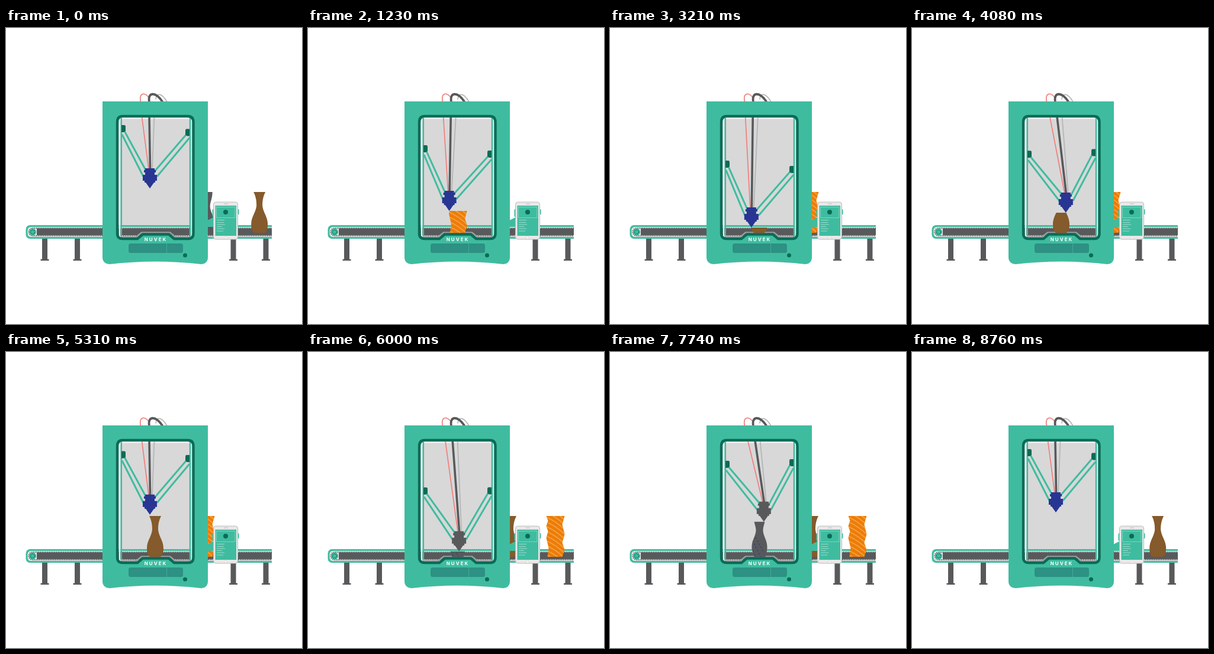
Recreate the animation shown at these times as an HTML page. Size 500x500 px, loop 8790 ms.

```html
<!DOCTYPE html>
<html lang="en">
<head>
<meta charset="utf-8">
<title>Printing line</title>
<style>
  html, body { margin: 0; width: 100%; height: 100%; overflow: hidden; background: #fff; }
  svg { display: block; width: 100vw; height: 100vh; }
  .green { fill: #3fbc9f; }
  .deep { fill: #0b6b57; }
  .dark { fill: #58595b; }
  .line { fill: none; }
  .name { font: 700 8px Inter, "Liberation Sans", sans-serif; letter-spacing: 2px; fill: #fff; }
</style>
</head>
<body>
<svg viewBox="0 0 500 500">
  <defs>
    <clipPath id="stage"><rect width="449" height="500"/></clipPath>
    <clipPath id="glass"><rect x="190" y="151" width="125" height="204"/></clipPath>
    <path id="pane" d="M197 149H307Q316.500 149 316.500 159V347Q316.500 356 308 356H284L275 348.500H231L222 356H197Q188 356 188 347V159Q188 149 197 149Z"/>
    <path id="twist" d="M-15 277H16L12 291L16 308L12 322L16 334L12 346H-13L-11 331L-15 314L-12 303L-15 294L-12 285Z"/>
    <path id="vase" d="M-10 277H10C6 285 5 292 5 300C6 312 14 318 14 332C14 340 11 346 8 346H-8C-11 346 -14 340 -14 332C-14 318 -6 312 -5 300C-5 292 -6 285 -10 277Z"/>
    <path id="urn" d="M-10 277H10C10 288 6 294 6 301C6 310 13 318 13 329C13 337 11 342 10 346H-9C-10 342 -13 337 -13 329C-13 318 -6 310 -6 301C-6 294 -10 288 -10 277Z"/>
    <clipPath id="twistEdge"><use href="#twist"/></clipPath>
    <clipPath id="urnEdge"><use href="#urn"/></clipPath>
    <clipPath id="grow0"><rect x="-30" y="270" width="60" height="80"/></clipPath>
    <clipPath id="grow1"><rect x="-30" y="270" width="60" height="80"/></clipPath>
    <clipPath id="grow2"><rect x="-30" y="270" width="60" height="80"/></clipPath>
    <path id="leg" class="dark" d="M-4.500 355H4.500V390.500H7V393H-7V390.500H-4.500Z"/>
  </defs>

  <rect x="188" y="149" width="128" height="207" fill="#d8d8d8"/>

  <g clip-path="url(#stage)">
    <use href="#leg" x="65.500"/><use href="#leg" x="120.500"/>
    <use href="#leg" x="384"/><use href="#leg" x="439"/>
    <rect class="green" x="33.500" y="333" width="440" height="23" rx="7"/>
    <rect x="36.500" y="336" width="440" height="17" rx="5.500" fill="#e8e8e8"/>
    <rect class="dark" x="52" y="338.500" width="420" height="11.500"/>
    <path class="line teeth" d="M470 338H45A6.500 6.500 0 0 0 45 351H470" stroke="#58595b" stroke-width="1.800" stroke-dasharray="1.500 1.500"/>
    <circle class="green" cx="45" cy="344.500" r="6"/>
    <circle class="line teeth" cx="45" cy="344.500" r="3.600" stroke="#0b6b57" stroke-width="1.500" stroke-dasharray="1.500 1.500"/>
    <path class="line" d="M194 353.500H219L229 345.500H277L287 353.500H312" stroke="#9b9d9e" stroke-width="2.500"/>

    <g class="item"><g clip-path="url(#grow0)">
      <use href="#twist" fill="#ec7d08"/>
      <path id="orangeLines" class="line" clip-path="url(#twistEdge)" stroke="#f7a345" stroke-width="1.700"/>
    </g></g>
    <g class="item"><g clip-path="url(#grow1)"><use href="#vase" fill="#855a2c"/></g></g>
    <g class="item"><g clip-path="url(#grow2)">
      <use href="#urn" class="dark"/>
      <path class="line" clip-path="url(#urnEdge)" d="M-12 318L2 346M-7 313L8 340M-14 330L-6 346" stroke="#283593" stroke-dasharray="3 3"/>
    </g></g>
  </g>

  <path class="green" d="M340 325L352 319V336H340Z"/>
  <g>
    <rect class="green" x="348.500" y="306" width="4" height="13" rx="1.500"/>
    <rect class="green" x="390" y="306" width="3.500" height="9" rx="1.500"/>
    <rect x="350.500" y="294" width="41" height="63" rx="4" fill="#e9e9e9" stroke="#b9bbbc"/>
    <path class="line" d="M368 297H375" stroke="#b9bbbc"/>
    <rect class="green" x="353.500" y="300" width="35.500" height="51"/>
    <rect class="line" x="355.500" y="302.500" width="31.500" height="18" stroke="#7fd2be"/>
    <circle class="deep" cx="371" cy="311" r="4"/>
    <path class="line" d="M356 324.500H369M356 328.500H368M356 332H370M356 335.500H365M356 339H369M356 343H367" stroke="#9adccc"/>
    <circle cx="371" cy="354.200" r="2" fill="#fff" stroke="#c4c6c7" stroke-width=".6"/>
  </g>

  <g class="line" stroke-linecap="round">
    <path d="M227.500 125C224 108 236 108 242 119" stroke="#f07f7c" stroke-width="1.700"/>
    <path d="M253 120C255 108 264 111 271.500 124" stroke="#b4b6b7" stroke-width="1.700"/>
    <path d="M242 125C239 108 252 107 264 124" stroke="#58595b" stroke-width="3.800"/>
  </g>

  <path class="green" fill-rule="evenodd" d="M163 124H341V387Q341 398 330 399Q252 390 175 399Q163 398 163 387ZM197 149Q188 149 188 159V347Q188 356 197 356H222L231 348.500H275L284 356H308Q316.500 356 316.500 347V159Q316.500 149 307 149Z"/>
  <g class="line" clip-path="url(#glass)">
    <path d="M192 354V160Q192 152.500 199 152.500H306Q313.500 152.500 313.500 160V354" stroke="#f2f2f2" stroke-width="2.500"/>
    <path d="M194.800 152V352M311 152V352" stroke="#3fbc9f" stroke-width="2.500"/>
  </g>
  <use href="#pane" class="line" stroke="#0b6b57" stroke-width="4.400"/>
  <text class="name" x="253" y="360" text-anchor="middle">NUVEK</text>
  <rect x="207" y="364" width="92" height="16" rx="3.500" fill="#2d9183"/>
  <path class="line" d="M271.500 364V380" stroke="#45a99a"/>
  <circle class="deep" cx="302.500" cy="384" r="3.500"/>

  <g clip-path="url(#glass)">
    <path id="red" class="line" stroke="#f07f7c" stroke-width="1.700"/>
    <path id="grey" class="line" stroke="#b4b6b7" stroke-width="1.800"/>
    <path id="black" class="line" stroke="#58595b" stroke-width="3.600"/>
    <path id="rods" class="line" stroke="#3fbc9f" stroke-width="3"/>
    <path id="left" class="deep" d="M195 -6H200Q202 -6 202 -3V4L199 6H195Z"/>
    <path id="right" class="deep" d="M310 -6H305Q303 -6 303 -3V4L306 6H310Z"/>
    <path id="head" d="M-8 -34H8V-31H10V-27H8V-23H12V-13H9V-10H7L0 0L-7 -10H-9V-13H-12V-23H-8V-27H-10V-31H-8Z"/>
  </g>
</svg>
<script>
  const LOOP = 8790, BASE = 346, FULL = 277, REST = { x: 243, y: 271 };
  const DROP = 150, LIFT = 30, EXIT = 8592, EXIT_SPEED = 0.433, EXIT_END = LOOP + 300;

  // Each job: print interval and [start, end, from, to] belt moves.
  const jobs = [
    { from: 300, to: 2035, home: 253, moves: [[2450, 2650, 253, 336.5], [5350, 5540, 336.5, 417.5]] },
    { from: 2897, to: 5300, home: 252, moves: [[5350, 5540, 252, 342]] },
    { from: 5675, to: 8079, home: 252.5, moves: [] }
  ];

  const $ = id => document.getElementById(id);
  const items = document.querySelectorAll(".item");
  const teeth = document.querySelectorAll(".teeth");
  const clamp = v => Math.max(0, Math.min(1, v));
  const mix = (a, b, k) => a + (b - a) * k;
  const part = (t, a, b) => clamp((t - a) / (b - a));
  const set = (id, d) => $(id).setAttribute("d", d);
  const place = (el, x, y) => el.setAttribute("transform", `translate(${x} ${y})`);

  let stripes = "";
  for (let y = 254; y < 350; y += 8) stripes += `M-17 ${y}Q2 ${y + 8} 17 ${y + 23}`;
  set("orangeLines", stripes);

  const exitShift = t => Math.max(0, Math.min(t, EXIT_END) - EXIT) * EXIT_SPEED;

  function itemX(job, t) {
    let x = job.home;
    for (const [a, b, from, to] of job.moves) if (t >= a) x = mix(from, to, part(t, a, b));
    return x + exitShift(t);
  }

  const jobTop = (job, t) => mix(BASE, FULL, part(t, job.from, job.to));

  function drawBelt(t) {
    // Items from the last round are still leaving as the loop begins.
    const time = t < jobs[0].from ? t + LOOP : t;
    jobs.forEach((job, i) => {
      const x = itemX(job, time);
      items[i].style.display = time >= job.from && x < 470 ? "" : "none";
      place(items[i], x, 0);
      $("grow" + i).firstElementChild.setAttribute("y", jobTop(job, time));
    });
    const shift = 84 * part(time, 2450, 2650) + 84 * part(time, 5350, 5540) + exitShift(time);
    teeth.forEach(el => el.style.strokeDashoffset = shift % 3);
  }

  function headPose(t) {
    const job = jobs.find(j => t >= j.from - DROP && t < j.to + LIFT);
    if (!job) return REST;
    const sweep = 248 - 12 * Math.cos(2 * Math.PI * (t - 1297) / 615);
    const k = Math.min(part(t, job.from - DROP, job.from), 1 - part(t, job.to - 200, job.to));
    let y = jobTop(job, t);
    if (t < job.from) y = mix(REST.y, BASE, part(t, job.from - DROP, job.from));
    if (t > job.to) y = mix(FULL, REST.y, part(t, job.to, job.to + LIFT));
    return { x: mix(REST.x, sweep, k), y };
  }

  function drawHead(t) {
    const { x, y } = headPose(t);
    const dx = x - REST.x, drop = 0.93 * (y - REST.y);
    const yl = 170 + drop + 0.3 * dx, yr = 176.5 + drop - 0.25 * dx;
    const grey = t >= jobs[2].from && t < jobs[2].to;
    place($("head"), x, y);
    $("head").setAttribute("fill", grey ? "#58595b" : "#283593");
    place($("left"), 0, yl);
    place($("right"), 0, yr);
    set("rods", `M200 ${yl + 4}L${x - 7} ${y - 31}M196 ${yl + 10}L${x - 11} ${y - 20}` +
      `M304 ${yr + 4}L${x + 9} ${y - 30}M310 ${yr + 9}L${x + 12} ${y - 20}`);
    const cable = (id, top, lean, end) => set(id, `M${top + lean * dx} 150L${x + end} ${y - 33}`);
    cable("red", 229.5, 0.2, -2);
    cable("black", 242, 0.18, 0.5);
    cable("grey", 250.5, 0.18, 4);
  }

  const begin = performance.now();
  function draw() {
    const t = Math.max(0, performance.now() - begin) % LOOP;
    drawBelt(t);
    drawHead(t);
    requestAnimationFrame(draw);
  }
  draw();
</script>
</body>
</html>
```
